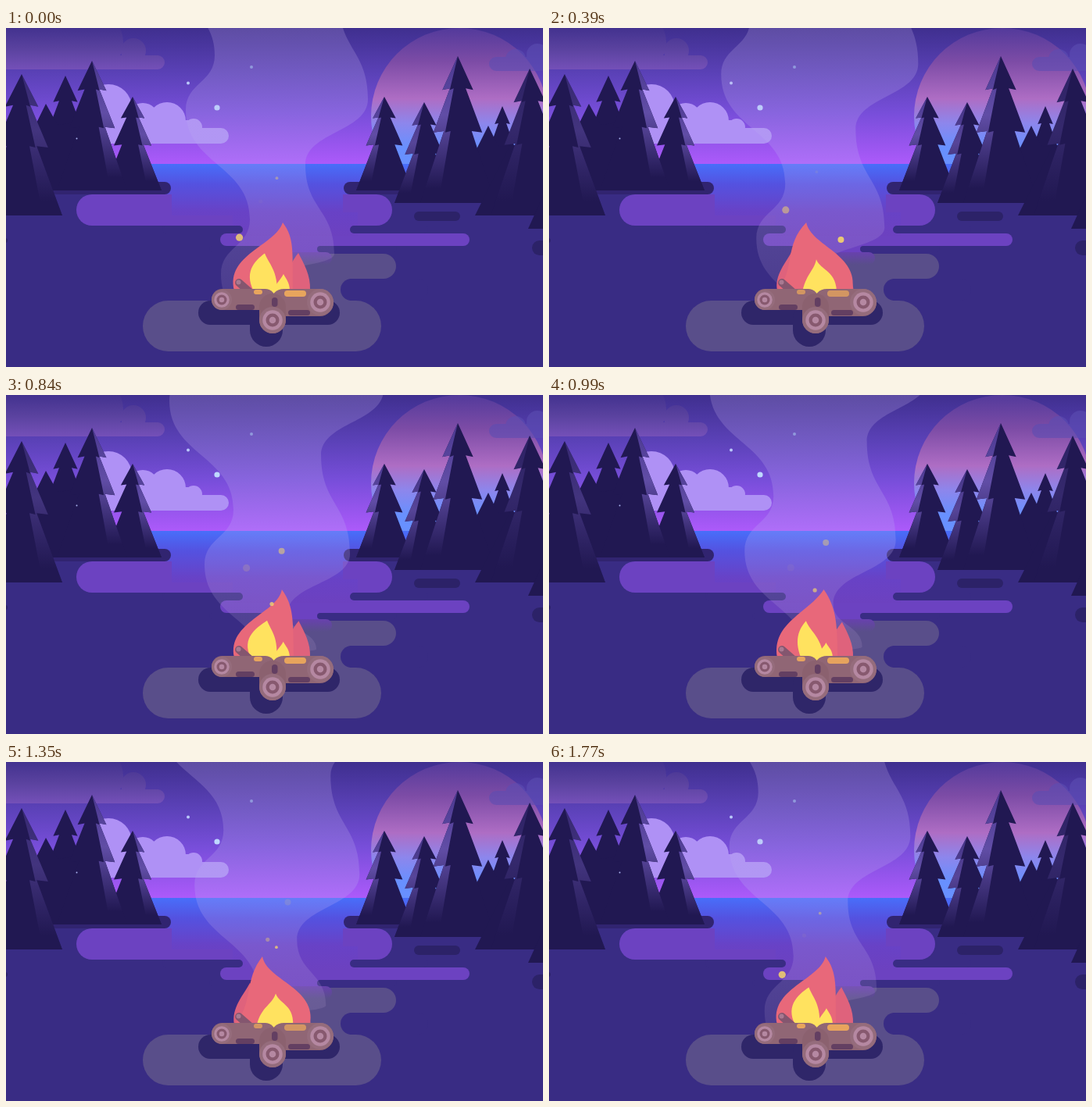
Animation, 687 px wide and 434 px high, one loop 1800 ms. Source, as an HTML page with a canvas:

```html
<!DOCTYPE html>
<html lang="en">
<head>
<meta charset="utf-8">
<title>Campfire by the lake</title>
<style>
html, body { margin: 0; width: 100%; height: 100%; overflow: hidden; background: #392c84; }
canvas { display: block; width: 687px; height: 434px; }
</style>
</head>
<body>
<canvas id="stage" width="687" height="434"></canvas>
<script>
const W = 687, H = 434, LOOP = 1800, FLICKER = 900, STEP = 30;
const LAND = '#392c84', PINE = '#211852', SHADE = '#2c2268', GLOW = '#594e8a';
const stage = document.getElementById('stage').getContext('2d');
const scenery = document.createElement('canvas');
scenery.width = W;
scenery.height = H;
let c = scenery.getContext('2d');

function fade(y0, y1, ...stops) {
  const g = c.createLinearGradient(0, y0, 0, y1);
  stops.forEach(([at, color]) => g.addColorStop(at, color));
  return g;
}
function rect(x0, y0, x1, y1, fill) {
  c.fillStyle = fill;
  c.fillRect(x0, y0, x1 - x0, y1 - y0);
}
function pill(x0, y0, x1, y1, fill) {
  c.fillStyle = fill;
  c.beginPath();
  c.roundRect(x0, y0, x1 - x0, y1 - y0, Math.min(x1 - x0, y1 - y0) / 2);
  c.fill();
}
function dot(x, y, r, fill) {
  c.fillStyle = fill;
  c.beginPath();
  c.arc(x, y, r, 0, Math.PI * 2);
  c.fill();
}
function poly(points, fill) {
  c.fillStyle = fill;
  c.beginPath();
  points.forEach(([x, y]) => c.lineTo(x, y));
  c.fill();
}
function clipped(x0, y0, x1, y1, draw) {
  c.save();
  c.beginPath();
  c.rect(x0, y0, x1 - x0, y1 - y0);
  c.clip();
  draw();
  c.restore();
}
// A pill and its puffs filled as one silhouette
function cloud(puffs, [x0, y0, x1, y1], fill) {
  c.fillStyle = fill;
  c.beginPath();
  c.roundRect(x0, y0, x1 - x0, y1 - y0, (y1 - y0) / 2);
  puffs.forEach(([x, y, r]) => {
    c.moveTo(x + r, y);
    c.arc(x, y, r, 0, Math.PI * 2);
  });
  c.fill();
}

// Half outline of a pine: share of width, share of height
const PROFILE = [[0, 0], [.41, .23], [.21, .22], [.65, .52], [.37, .51], [1, 1]];

// side: 1 lit on the right, -1 on the left, 0 unlit
function tree(x, top, base, half, side = 0, light = 0) {
  const edge = (dir, width) =>
    PROFILE.map(([u, v]) => [x + dir * u * width, top + v * (base - top)]);
  const dir = side || 1;
  const far = edge(-dir, half).reverse();
  poly([...far, ...edge(dir, half)], PINE);
  if (!side) return;
  c.globalAlpha = light;
  poly([...edge(dir, half), ...edge(dir, half * .52).reverse()],
    fade(top, base, [0, '#4d3a94'], [.4, '#6450aa'], [.9, PINE]));
  c.globalAlpha = 1;
}

function drawSky() {
  rect(0, 0, W, 175, fade(0, 174, [0, '#3f2f8f'], [.35, '#5c42b9'], [.63, '#784eda'], [1, '#ac5afa']));
  dot(580, 113, 113, fade(0, 174, [0, '#533a9b'], [.25, '#7d4ca6'], [.52, '#ae6dc4'], [.7, '#8d86ec'], [.88, '#6890ff']));
  clipped(0, 0, W, 53, () =>
    cloud([[110, 18, 40], [163, 29, 16], [20, 10, 60], [70, 15, 38]], [-20, 35, 203, 53],
      fade(0, 53, [0, '#43328f'], [.5, '#5a429f'], [1, '#7450b8'])));
  cloud([[652, 40, 13], [680, 34, 14]], [618, 37, 720, 55], 'rgba(92,78,178,.6)');
  clipped(0, 0, W, 148, () => {
    cloud([[131, 102, 30], [175, 117, 21], [206, 119, 24], [240, 127, 11]], [105, 128, 285, 148], '#af91f5');
    rect(130, 118, 240, 148, '#af91f5');
  });
  dot(270, 102, 3.6, '#bed8ff');
  dot(233, 70.5, 2, '#b9c8fa');
  dot(314, 50, 2, '#8294d8');
}

function drawGround() {
  const lake = fade(174, 303, [0, '#486efa'], [.2, '#5452e0'], [.47, '#6842c6'], [1, '#7140b8']);
  const bar = '#6c42c1';
  rect(0, 174, W, 215, lake);
  rect(0, 205, W, H, LAND);
  rect(190, 200, 452, 214, lake);
  pill(-20, 197, 211, 213, '#312470');
  pill(432, 197, 720, 213, '#312470');

  pill(360, 289, 499, 321, GLOW);
  rect(345, 305, 440, 360, GLOW);
  pill(175, 349, 480, 414, GLOW);
  pill(428, 321, 540, 349, LAND);

  pill(90, 213, 494, 253, bar);
  rect(212, 212, 431, 240, lake);
  pill(274, 263, 593, 279, bar);
  rect(290, 236, 450, 266, lake);
  pill(200, 253, 303, 263, LAND);
  pill(440, 253, 540, 263, LAND);
  rect(335, 276, 406, 290, bar);
  pill(260, 279, 342, 287, LAND);
  pill(398, 279, 500, 287, LAND);
  pill(325, 287, 417, 303, fade(287, 303, [0, '#6841ae'], [1, GLOW]));

  pill(522, 235, 581, 247, SHADE);
  pill(673, 272, 720, 291, SHADE);
  dot(-1, 272, 3, SHADE);
  pill(246, 349, 427, 380, '#2f2669');
  pill(312, 350, 354, 408, '#2f2669');
}

function drawTrees() {
  tree(76, 61, 208, 38);
  poly([[51, 97], [20, 160], [20, 208], [130, 208], [95, 120], [66, 124]], PINE);
  tree(162, 88, 208, 37, 1, .95);
  tree(110, 42, 208, 45, 1, .95);
  tree(20, 59, 240, 52, 1, .5);
  dot(90.5, 141.5, 1, '#aab4f0');

  tree(484, 88, 208, 36, -1, .95);
  tree(535, 95, 224, 38, -1, .8);
  tree(635, 100, 200, 24);
  poly([[617, 125], [602, 155], [560, 224], [660, 224], [648, 150], [630, 152]], PINE);
  tree(578, 36, 224, 48, -1, .95);
  poly([[645, 150], [600, 240], [687, 240], [687, 150]], PINE);
  tree(670, 52, 240, 50, -1, .3);
  poly([[668, 257], [687, 215], [687, 257]], PINE);
}

// Nodes with vertical tangents, joined by S-curves
function wave(nodes) {
  nodes.forEach(([x, y], i) => {
    if (!i) return c.lineTo(x, y);
    const [px, py] = nodes[i - 1], m = (y + py) / 2;
    c.bezierCurveTo(px, m, x, m, x, y);
  });
}
// Both edges climb one wavelength per loop while spreading outwards
function drawSmoke(t) {
  const left = [], right = [];
  const squeeze = y => y < 250 ? y : 250 + 90 * (1 - Math.exp((250 - y) / 90));
  for (let k = -1; k < 3; k++) {
    const q = k - t / LOOP;
    left.push([230 + 45 * q, 105 + 210 * q], [312 + 45 * q, 245 + 210 * q]);
    right.push([463 - 43 * q, squeeze(91 + 210 * q)], [383 - 43 * q, squeeze(175 + 210 * q)]);
  }
  clipped(0, 0, W, 337, () => {
    c.fillStyle = fade(0, 337, [0, 'rgba(185,165,225,.25)'], [.55, 'rgba(185,170,245,.25)'], [1, 'rgba(185,160,205,.15)']);
    c.beginPath();
    wave(left);
    wave(right.reverse());
    c.fill();
  });
}

// A teardrop: left foot, two controls, tip, two controls, right foot
function flame(base, fill, left, l1, l2, tip, r1, r2, right) {
  c.fillStyle = fill;
  c.beginPath();
  c.moveTo(left, base);
  c.bezierCurveTo(...l1, ...l2, ...tip);
  c.bezierCurveTo(...r1, ...r2, right, base);
  c.fill();
}
// Everything sways with one cosine; the side tongues rise in turn
function drawFire(t) {
  const a = t / FLICKER * Math.PI * 2, cos = Math.cos(a), sin = Math.sin(a);
  const red = '#e8687a', dim = '#df627c', yellow = '#ffe25f';

  const lx = 306 - 6 * cos, ly = 304 + 21 * cos;
  flame(336, dim, 292, [288, ly + 32], [lx - 8, ly + 15], [lx, ly], [lx + 12, ly + 10], [330, 300], 330);
  const rx = 379 - 5 * cos, ry = 302 - 14 * cos;
  flame(336, dim, 355, [360, 310], [rx - 8, ry + 10], [rx, ry], [rx + 7, ry + 14], [390, ry + 28], 389);
  flame(336, red, 292, [299 - 18 * cos, 300 - 10 * cos], [324 + 20 * cos - 14 * sin, 279],
    [341 + 13 * cos, 249], [352 + 18 * cos, 275 - 5 * cos], [382 - 16 * cos, 289], 378 - 11 * cos);

  const cx = 338 - 7 * cos - 6 * sin, cy = 292.5 - 4 * cos;
  flame(342, yellow, 320 + 8 * sin, [313 - 11 * cos + 13 * sin, 314], [329 - 11 * cos, 305 - 7 * cos],
    [cx, cy], [cx + 6, cy + 15], [359 - 11 * cos, 310], 357 - 10 * cos + 5 * sin);
  const sx = 352 + 3 * cos, sy = 325 - 10 * cos;
  flame(342, yellow, 340, [342, 330], [sx - 4, sy + 8], [sx, sy], [sx + 4, sy + 8], [364, 326], 363);
  return .88 + .12 * cos;
}

function logEnd(x, y, r) {
  ['#956c7c', '#b588a2', '#87596f', '#b588a2'].forEach((color, i) =>
    dot(x, y, r * (1 - .25 * i), color));
}
function drawLogs(ember) {
  const bark = '#906675', dark = '#633f62';
  c.lineCap = 'round';
  c.lineWidth = 10;
  c.strokeStyle = '#84566f';
  c.beginPath();
  c.moveTo(298, 326);
  c.lineTo(314, 340);
  c.stroke();
  dot(297.5, 325.5, 3, '#a87a92');
  pill(263, 334, 345, 361, bark);
  pill(338, 334, 419, 369, bark);
  pill(294, 354, 318, 361, dark);
  pill(361, 361, 389, 368, dark);
  pill(324, 340, 358, 391, '#8b616f');
  pill(340, 345, 347.5, 357, dark);
  logEnd(276, 348, 13);
  logEnd(402, 351, 17);
  logEnd(341, 374, 17);
  c.globalAlpha = ember;
  pill(317, 335, 328, 341, '#e8a55d');
  pill(356, 336, 384, 344, '#e8a55d');
  c.globalAlpha = 1;
}

// Sparks rise with a cubic ease-out, drifting and curling to their end point
const SPARKS = [
  { r: 4.6, born: 1560, from: 308, to: [310, 221], drift: 14, curl: 0 },
  { r: 4, born: 240, from: 312, to: [364, 179], drift: 24, curl: 64 },
  { r: 2.6, born: 540, from: 322, to: [325, 222], drift: -26, curl: -24 },
  { r: 1.9, born: 1020, from: 312, to: [341, 184], drift: -14, curl: -32 }
];
function drawSparks(t) {
  for (const { r, born, from, to, drift, curl } of SPARKS) {
    const u = (t - born + LOOP) % LOOP / 1300;
    if (u >= 1) continue;
    const left = 1 - u;
    const x = to[0] - drift * left + curl * left ** 6;
    const y = to[1] + (from - to[1]) * left ** 3;
    dot(x, y, r, `rgba(248,215,105,${left * Math.min(1, u * 14)})`);
  }
}

drawSky();
drawGround();
drawTrees();
c = stage;

function frame(now) {
  const t = Math.floor(now % LOOP / STEP) * STEP;
  c.drawImage(scenery, 0, 0);
  drawSmoke(t);
  drawLogs(drawFire(t));
  drawSparks(t);
  requestAnimationFrame(frame);
}
frame(0);
</script>
</body>
</html>
```
